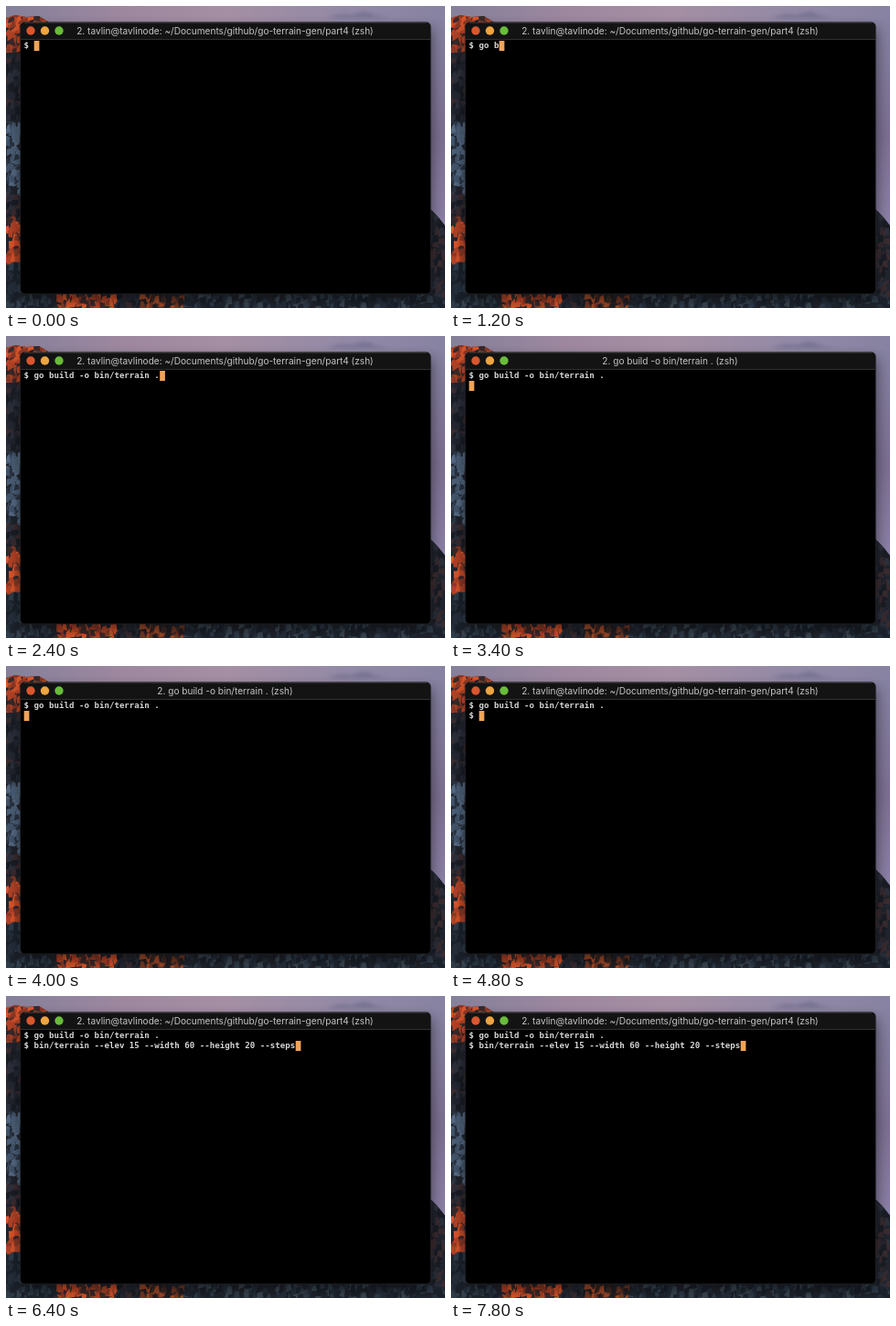
Recreate the animation shown at these times as an HTML page. Size 480x330 px, loop 8 s.

```html
<!DOCTYPE html>
<html lang="en">
<head>
<meta charset="utf-8">
<title>Terminal</title>
<style>
  html, body { margin: 0; width: 100%; height: 100%; overflow: hidden; background: #000; }
  svg { display: block; width: 480px; height: 330px; }
  text { white-space: pre; }
  .title { font: 10.08px Inter, sans-serif; fill: #c4c4c4; text-anchor: middle; }
  .line { font: bold 9.13px "DejaVu Sans Mono", monospace; fill: #d6d6d6; }
</style>
</head>
<body>
<svg viewBox="0 0 480 330">
  <defs>
    <linearGradient id="sky">
      <stop offset="0" stop-color="#85809a"/>
      <stop offset=".25" stop-color="#9c879f"/>
      <stop offset=".5" stop-color="#a58fa4"/>
      <stop offset=".8" stop-color="#9189a6"/>
      <stop offset="1" stop-color="#8882a2"/>
    </linearGradient>
    <linearGradient id="haze" x2="0" y2="1">
      <stop offset="0" stop-color="#8581a0"/>
      <stop offset=".4" stop-color="#7c6f91"/>
      <stop offset=".7" stop-color="#8b80a6"/>
      <stop offset="1" stop-color="#8c83a6"/>
    </linearGradient>
    <filter id="soft" x="-20%" y="-20%" width="140%" height="140%">
      <feGaussianBlur stdDeviation="7"/>
    </filter>
    <filter id="cloud" x="-20%" y="-80%" width="140%" height="260%">
      <feGaussianBlur stdDeviation="2"/>
    </filter>
    <clipPath id="rock">
      <path d="M0 13 L10 10 22 12 36 11 46 17 60 24 60 300 440 300 464 222 472 230 480 240 480 330 0 330Z"/>
    </clipPath>
  </defs>

  <rect width="480" height="330" fill="url(#sky)"/>
  <rect x="455" y="16" width="25" height="314" fill="url(#haze)"/>
  <path d="M352 13 Q365 7 378 10 Q394 3 402 10 L418 13Z" fill="#716d8e" filter="url(#cloud)" opacity=".8"/>
  <g clip-path="url(#rock)">
    <rect width="480" height="330" fill="#20242d"/>
    <g id="facets"></g>
  </g>

  <rect x="14" y="24" width="452" height="298" rx="6" filter="url(#soft)" opacity=".45"/>
  <rect x="15.7" y="17.7" width="448.6" height="297" rx="5" fill="#000" stroke="#2b2b30" stroke-width=".6"/>
  <path d="M16 36 V23 Q16 18 21 18 H459 Q464 18 464 23 V36Z" fill="#131314"/>
  <path d="M20 18.5 H460" stroke="#38383a" stroke-width=".7"/>
  <path d="M16 36.5 H464" stroke="#303031"/>
  <circle cx="27" cy="27" r="4.7" fill="#d9572f"/>
  <circle cx="42.5" cy="27" r="4.7" fill="#eea440"/>
  <circle cx="58" cy="27" r="4.7" fill="#69bc3a"/>

  <text id="title" class="title" x="239.5" y="30.7"></text>
  <rect id="cursor" width="5.7" height="11" fill="#f0a45a"/>
  <text id="line0" class="line" x="19.5" y="46.3"></text>
  <text id="line1" class="line" x="19.5" y="57.3"></text>
</svg>

<script>
const $ = id => document.getElementById(id);
const LOOP = 8000, CELL = 5.5, LINE = 11;
const BUILD = 'go build -o bin/terrain .';
const RUN = 'bin/terrain --elev 15 --width 60 --height 20 --steps';
const SHELL_TITLE = '2. tavlin@tavlinode: ~/Documents/github/go-terrain-gen/part4 (zsh)';
const BUILD_TITLE = `2. ${BUILD} (zsh)`;
const ENTER = 2800, BUILT = 4200;

// Small angular rock faces, scattered over one area of the mountain
let seed = 19;
const random = () => (seed = seed * 16807 % 2147483647) / 2147483647;
function scatter(left, top, width, height, count, colors) {
  for (let i = 0; i < count; i++) {
    const x = left + random() * width, y = top + random() * height;
    const corner = (dx, dy) => `${x + dx + random() * 3},${y + dy + random() * 4}`;
    const facet = document.createElementNS('http://www.w3.org/2000/svg', 'polygon');
    facet.setAttribute('points', [corner(-3, -4), corner(1, -5), corner(2, 2), corner(-4, 3)].join(' '));
    facet.setAttribute('fill', colors[Math.floor(random() * colors.length)]);
    $('facets').append(facet);
  }
}
const sunlit = ['#c74a27', '#d9552b', '#b24327', '#8a3826', '#3a2a2b'];
const dark = ['#1a1d25', '#242833', '#2c303c', '#3a2c30'];
const snow = ['#4c6078', '#566a84', '#42546b', '#2b3442'];
const brown = ['#743824', '#a34b28', '#3b2925', '#241f22'];
const blue = ['#1b222c', '#252f3c', '#2f3c4a', '#1f2731', '#3b4752'];

scatter(0, 50, 16, 75, 60, dark);
scatter(0, 8, 55, 40, 110, sunlit);
scatter(0, 128, 16, 88, 90, snow);
scatter(0, 206, 16, 22, 22, dark);
scatter(0, 230, 16, 50, 55, sunlit);
scatter(0, 282, 16, 48, 40, blue);
scatter(16, 314, 36, 16, 30, blue);
scatter(195, 314, 285, 16, 190, blue);
scatter(120, 314, 28, 16, 25, dark);
scatter(148, 314, 46, 16, 45, brown);
scatter(54, 314, 64, 16, 75, sunlit);
scatter(464, 222, 16, 92, 65, dark);

function typed(text, time, start, end) {
  const progress = Math.max(0, Math.min(1, (time - start) / (end - start)));
  return text.slice(0, Math.floor(progress * text.length + 1e-6));
}

function draw(now) {
  const time = now % LOOP;
  const first = '$ ' + typed(BUILD, time, 1000, 2250);
  const second = time < BUILT ? '' : '$ ' + typed(RUN, time, 4900, 6380);
  const row = time < ENTER ? 0 : 1;
  const column = (row ? second : first).length;

  $('title').textContent = time >= ENTER && time < BUILT ? BUILD_TITLE : SHELL_TITLE;
  $('line0').textContent = first;
  $('line1').textContent = second;
  $('cursor').setAttribute('x', 19.7 + column * CELL);
  $('cursor').setAttribute('y', 38 + row * LINE);
}

const origin = performance.now();
function tick() {
  draw(performance.now() - origin);
  requestAnimationFrame(tick);
}
tick();
</script>
</body>
</html>
```
